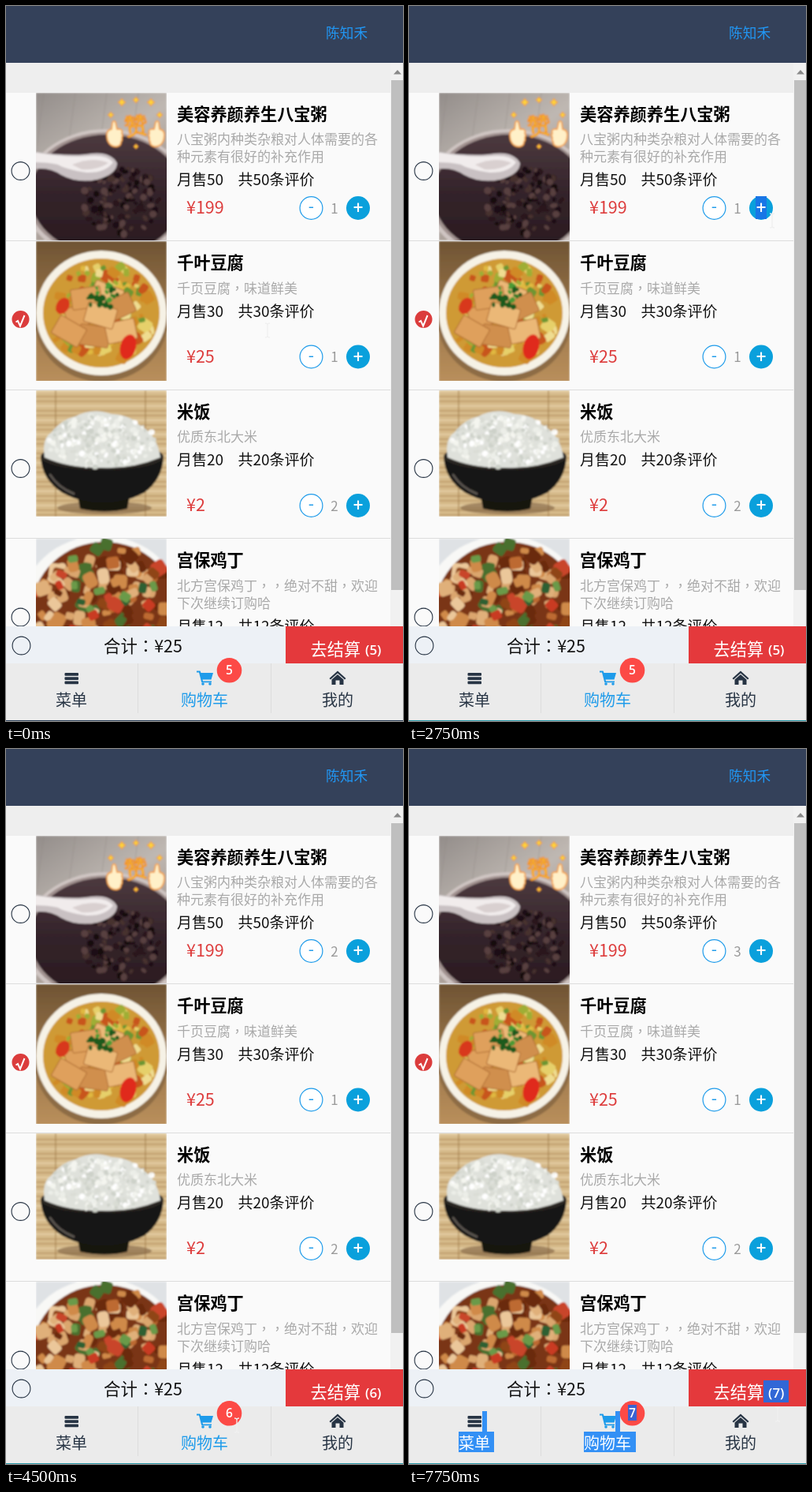
Animation of 504 by 906 pixels, one loop 8 s. Source, as an HTML page:

```html
<!DOCTYPE html>
<html lang="zh-CN">
<head>
<meta charset="utf-8">
<style>
html, body { margin: 0; width: 100%; height: 100%; overflow: hidden; background: #eee; }
svg { display: block; width: 100%; height: 100%; font-family: "Noto Sans CJK SC", "Noto Sans CJK", sans-serif; }
.stop { font-family: "Noto Sans CJK TC", "Noto Sans CJK", sans-serif; } /* centred punctuation */
.latin { font-family: "Open Sans", "Noto Sans", sans-serif; font-weight: 600; }
</style>
</head>
<body>
<svg id="stage" viewBox="0 0 504 906"></svg>
<script>
const MID = 0.375; // distance from baseline to glyph middle, in em
const BLUE = '#1e9bea', RED = '#e4393c', DARK = '#273444';

let seed = 7;
const rnd = (a = 0, b = 1) => (seed = seed * 16807 % 2147483647, a + seed / 2147483647 * (b - a));
const pick = list => list[Math.floor(rnd(0, list.length))];
const times = (n, f) => Array.from({ length: n }, (_, i) => f(i)).join('');

const rect = (x, y, w, h, fill, more = '') =>
  `<rect x="${x}" y="${y}" width="${w}" height="${h}" fill="${fill}" ${more}/>`;
const oval = (x, y, rx, ry, fill, more = '') =>
  `<ellipse cx="${x}" cy="${y}" rx="${rx}" ry="${ry}" fill="${fill}" ${more}/>`;
const path = (d, fill, more = '') => `<path d="${d}" fill="${fill}" ${more}/>`;
// y is the vertical middle of the line
const text = (s, x, y, size, fill, more = '') =>
  `<text x="${x}" y="${y + size * MID}" font-size="${size}" fill="${fill}" ${more}>` +
  String(s).replace(/[，：]/g, '<tspan class="stop" lang="zh-TW">$&</tspan>') + '</text>';
const turn = (a, x, y) => `transform="rotate(${a} ${x} ${y})"`;
const mid = 'text-anchor="middle"';

// a point spread evenly inside an ellipse
function inside(cx, cy, rx, ry) {
  const a = rnd(0, 6.283), r = Math.sqrt(rnd());
  return [cx + rx * r * Math.cos(a), cy + ry * r * Math.sin(a)];
}
const scatter = (n, area, colors, lo, hi, shape) => times(n, () => {
  const [x, y] = inside(...area), w = rnd(lo, hi), h = w * rnd(.6, 1), a = turn(rnd(0, 180), x, y);
  return shape === 'oval' ? oval(x, y, w, h, pick(colors), a)
    : rect(x - w, y - h, 2 * w, 2 * h, pick(colors), `rx="${w * .5}" ${a}`);
});

function photo(id, y, h, art) {
  return `<clipPath id="${id}"><rect x="38" y="${y}" width="166" height="${h}"/></clipPath>
    <g clip-path="url(#${id})"><g filter="url(#soft)">${art}</g></g>`;
}

function sticker() {
  const hand = path('M128 163q0-6 6-7l1-8q1-4 4-1l2 9h4q4 2 2 5q2 3 0 6q1 3-1 5q0 5-5 6q-6 1-10-4q-3-4-3-11z',
    '#fff0c8', 'stroke="#f3a04a" stroke-width="1.8"');
  const spark = (x, y, r) => path(`M${x} ${y - r}l${r * .4} ${r * .6}l${r * .6} ${r * .4}l${-r * .6} ${r * .4}l${-r * .4} ${r * .6}l${-r * .4} ${-r * .6}l${-r * .6} ${-r * .4}l${r * .6} ${-r * .4}z`, '#ffd23e', 'stroke="#f0902a"');
  return hand + `<g transform="matrix(-1 0 0 1 329 0)">${hand}</g>` +
    spark(147, 122, 5) + spark(165, 119, 4) + spark(184, 122, 5) + spark(195, 138, 4) + spark(133, 138, 4) + spark(165, 178, 3) +
    text('赞', 165, 152, 30, '#ffd42a', `${mid} stroke="#f0902a" stroke-width="1.3" ${turn(-6, 165, 152)}`);
}

const porridge = () =>
  rect(38, 110, 166, 187, 'url(#wood)') +
  times(4, i => path(`M${48 + i * 40} 110l-12 90`, 'none', 'stroke="#8d8580" stroke-opacity=".4"')) +
  oval(127, 240, 105, 84, '#cfc5c2') + oval(127, 239, 101, 79, '#a0918f') + oval(128, 239, 97, 76, 'url(#soup)') +
  scatter(130, [146, 246, 52, 44], ['#1d1013', '#2a181b', '#46302f', '#59413f', '#180c0f'], 2.5, 5, 'oval') +
  path('M34 184Q72 190 100 188Q132 182 141 199Q141 213 116 220Q90 225 70 214Q54 203 34 207z', '#c9c1c3') +
  path('M34 185Q80 193 106 190Q128 188 136 198Q126 212 102 211Q76 207 66 201Q54 198 34 198z', '#f1ecec') +
  path('M84 201Q110 190 130 199Q114 209 96 207z', '#d9d0d0') + sticker();

const tofu = () =>
  rect(38, 298, 166, 178, 'url(#cloth)') +
  oval(121, 393, 86, 83, '#8d6c44') + oval(121, 389, 83, 79, '#f6f2e6') + oval(121, 389, 74, 69, '#cf9a34') +
  scatter(110, [121, 389, 68, 63], ['#e0b83f', '#9fae34', '#d08a26', '#e6d06a', '#6d9630', '#c8541f', '#efdc90'], 3, 8) +
  [[95, 392, -15], [128, 366, 22], [112, 418, 8], [80, 412, 30], [146, 412, -12], [143, 382, -25], [102, 370, -8], [120, 392, 16]]
    .map(([x, y, a], i) => rect(x - 19, y - 13, 38, 26, ['#dfa05c', '#ebb877', '#d08f4e'][i % 3], `rx="2" stroke="#b06e34" ${turn(a, x, y)}`)).join('') +
  oval(155, 432, 10, 16, '#e02c1a', turn(15, 155, 432)) + oval(72, 380, 8, 11, '#d8371c', turn(30, 72, 380)) +
  scatter(26, [123, 368, 20, 18], ['#2f7a26', '#4b9a34', '#1f5a1c'], 2, 5, 'oval');

const rice = () =>
  rect(38, 487, 166, 160, '#d6ba8a') +
  times(27, i => rect(38, 488 + i * 6, 166, 1.6, i % 3 ? '#bd9b69' : '#e6d1a8')) +
  [62, 176].map(x => rect(x, 487, 2, 160, '#a27c4a', 'opacity=".5"')).join('') +
  oval(125, 636, 60, 8, '#7d6040', 'opacity=".6"') +
  path('M90 616h68l-4 21q-28 7-60 0z', '#15120f') +
  path('M44 570Q45 600 72 617Q96 630 123 630Q150 630 175 617Q199 600 200 570z', '#161412') +
  oval(122, 571, 78, 17, '#2c2724') +
  path('M49 572Q45 548 58 540Q70 524 88 520Q110 508 134 517Q156 518 168 530Q192 542 196 572Q160 587 122 585Q80 586 49 572z', '#dfe1db') +
  scatter(260, [122, 552, 69, 33], ['#fff', '#f4f5ef', '#d9dcd4', '#eceee8', '#cdd1c9'], 1.5, 4, 'oval') +
  path('M56 594Q66 610 86 618', 'none', 'stroke="#5a5450" stroke-width="3" stroke-linecap="round"');

const chicken = () =>
  rect(38, 675, 166, 111, '#dfe2e5') + oval(121, 768, 104, 97, '#f8f8f6') + oval(125, 766, 92, 87, '#7a3413') +
  scatter(150, [125, 762, 89, 80], ['#d08a48', '#bd6a30', '#e0b07a', '#ebc79a', '#8f4519', '#c9452a', '#4a6f2e', '#cf8a4a', '#dba66e', '#6b2a10'], 5, 10) +
  scatter(12, [121, 735, 72, 48], ['#2e6030', '#6b9a48', '#c93a20'], 5, 8);

const shade = (id, x2, ...colors) => `<linearGradient id="${id}" x2="${x2}" y2="1">` +
  colors.map((c, i) => `<stop offset="${i / (colors.length - 1)}" stop-color="${c}"/>`).join('') + '</linearGradient>';
const defs = `<defs><filter id="soft"><feGaussianBlur stdDeviation=".8"/></filter>` +
  shade('wood', .6, '#938d8a', '#bfb8b2', '#96877f') + shade('cloth', 0, '#6f5434', '#9a7548', '#b98f5c') +
  shade('soup', 0, '#4d3a3f', '#33232a', '#2a1b1f') + '</defs>';

const check = (x, y) => oval(x, y, 11.4, 11.4, 'none', `stroke="${DARK}" stroke-width="1.1"`);

function dish(y, name, lines, sold, price, count, id) {
  const soldY = y + 39 + lines.length * 22;
  let s = text(name, 217, y, 21.2, '#000', 'font-weight="bold"') +
    lines.map((l, i) => text(l, 217, y + 32 + i * 22, 17, '#a9a9a9')).join('') +
    text('月售' + sold, 217, soldY, 19, '#111') + text(`共${sold}条评价`, 294.5, soldY, 19, '#111');
  if (price) {
    const by = y + 119;
    s += text('¥' + price, 229, by - 1, 21.5, '#dd3b3b') +
      oval(387.5, by, 14.4, 14.4, '#fff', `stroke="${BLUE}" stroke-width="1.2"`) +
      text('-', 387.5, by - 2.5, 21, BLUE, mid) +
      text(count, 417, by + .5, 17, '#999', `${mid} id="${id}"`) +
      oval(447, by, 15, 15, '#0aa0dc') +
      (id === 'qty' ? rect(440, 241, 14, 29, '#1976e6', 'id="selPlus"') : '') +
      text('+', 447, by - .5, 23, '#fff', `${mid} class="latin"`);
  }
  return s;
}

const list =
  rect(0, 72, 488, 38, '#eee') + rect(0, 110, 488, 676, '#fafafa') +
  photo('p1', 110, 187, porridge()) + photo('p2', 298, 177, tofu()) +
  photo('p3', 487, 160, rice()) + photo('p4', 675, 111, chicken()) +
  [297, 486, 674].map(y => rect(0, y, 488, 1, '#dcdcdc')).join('') +
  check(18.5, 209) + check(18.5, 586) + check(18.5, 774.5) +
  oval(18.5, 397, 11, 11, '#db3c3c') +
  path('M12.5 400.5L15 399L18 405.5L23.500 392', 'none', 'stroke="#fff" stroke-width="2"') +
  dish(137, '美容养颜养生八宝粥', ['八宝粥内种类杂粮对人体需要的各', '种元素有很好的补充作用'], 50, 199, 1, 'qty') +
  dish(325.5, '千叶豆腐', ['千页豆腐，味道鲜美'], 30, 25, 1, 'q2') +
  dish(514, '米饭', ['优质东北大米'], 20, 2, 2, 'q3') +
  dish(702.5, '宫保鸡丁', ['北方宫保鸡丁，，绝对不甜，欢迎', '下次继续订购哈'], 12);

const scrollbar = rect(488, 72, 16, 714, '#f1f1f1') + path('M492 86.5l5-5.5l5 5.5z', '#8a8a8a') + rect(489, 94, 15, 646, '#bfbfbf');

const cart = path('M242 842.5h4.5l1 2.5H263l-2.5 8.5H249.5l.5 2H261v1.8H248.3L245 844.5h-3z', BLUE) +
  oval(250, 859, 1.8, 1.8, BLUE) + oval(259, 859, 1.8, 1.8, BLUE);
const house = path('M410.5 852L421 842.5L431.5 852L430 853.5L421 845.5L412 853.5z', DARK) +
  path('M413.5 853.5L421 847L428.5 853.5V860H423.5V854.5H418.5V860H413.5z', DARK);

const footer =
  rect(0, 786, 355, 47, '#edf1f6') + check(19.5, 810.5) + text('合计：¥25', 124, 811, 21.4, '#111') +
  rect(355, 786, 149, 47, RED) + rect(450, 800, 32, 28, '#3267d6', 'class="selAll"') +
  text('去结算', 386.5, 815, 21.2, '#fff') + text('(5)', 456, 815.5, 17, '#fff', 'id="total" class="latin"') +
  rect(0, 833, 504, 73, '#ebebeb') + rect(167, 833, 1, 63, '#dcdcdc') + rect(336, 833, 1, 63, '#dcdcdc') +
  times(3, i => rect(74.5, 845 + i * 5.2, 17.5, 3.8, DARK, 'rx="1"')) + cart + house +
  text('菜单', 63, 879.5, 20, DARK) + text('购物车', 222, 879.5, 20, BLUE) + text('我的', 401, 879.5, 20, DARK) +
  `<g class="selAll">${[[93, 839, 6], [63, 865, 45], [262, 839, 6], [222, 865, 66]].map(([x, y, w]) => rect(x, y, w, 26, '#3390f5')).join('')}
    ${text('菜单', 63, 879.5, 20, '#fff')}${text('购物车', 222, 879.5, 20, '#fff')}</g>` +
  oval(283.5, 841.8, 15.8, 15.8, '#fc4a46') + rect(278, 831, 11, 20, '#3b62d2', 'id="selBadge"') +
  text('5', 283.5, 841.3, 15.5, '#fff', `id="badge" ${mid} class="latin"`) +
  rect(0, 905, 504, 1, '#2c4058', 'id="edge"');

const ink = 'stroke="#000" stroke-width="1.3" stroke-linejoin="round"';
const pointers = {
  arrow: path('M0 0V20.5L4.5 16.5L8 24.5L11.5 23L8.3 15H14z', '#fff', ink),
  beam: path('M-3 -9Q0 -9 0 -7Q0 -9 3 -9M0 -7V7M-3 9Q0 9 0 7Q0 9 3 9', 'none', 'stroke="#f0f0f0" stroke-width="1.3"'),
  hand: path('M-2 2Q-2 0 0 0Q2 0 2 2V10Q6 8 6 11Q10 9 10 12Q14 10.5 14 14V20Q14 24 11 26V30H-1V26L-7 18Q-9 14 -6 14L-2 17z', '#fff', ink) +
    path('M2 10V15M6 11V15.5M10 12V16', 'none', ink)
};

document.getElementById('stage').innerHTML = defs + list + scrollbar +
  rect(0, 0, 504, 72, '#34415a') + text('陈知禾', 406, 34, 17.7, '#2196f3') + footer +
  `<g id="cursor">${Object.keys(pointers).map(k => `<g id="${k}">${pointers[k]}</g>`).join('')}</g>`;

// time, x, y, pointer while resting there
const track = [
  [0, 332, 411, 'beam'], [1250, 235, 660, 'arrow'], [2000, 447, 258, 'arrow'], [2500, 447, 258, 'arrow'],
  [2750, 461, 272, 'beam'], [3750, 461, 272, 'beam'], [4500, 293, 857, 'beam'], [5000, 293, 857, 'beam'],
  [5750, 460, 263, 'arrow'], [6500, 460, 263, 'arrow'], [7250, 361, 849, 'hand'], [7750, 468, 843, 'beam'], [8000, 468, 843, 'beam']
];
const $ = id => document.getElementById(id);
const show = (el, on) => el.setAttribute('visibility', on ? 'visible' : 'hidden');

function frame(now) {
  const t = Math.floor(now % 8000 / 250) * 250; // the picture ticks four times a second
  const i = track.findIndex((k, n) => t >= k[0] && t < track[n + 1][0]);
  const [t0, x0, y0, kind] = track[i], [t1, x1, y1] = track[i + 1];
  const p = (t - t0) / (t1 - t0), moving = p > 0 && (x0 !== x1 || y0 !== y1);
  $('cursor').setAttribute('transform', `translate(${x0 + (x1 - x0) * p} ${y0 + (y1 - y0) * p})`);
  for (const k in pointers) show($(k), k === (moving ? 'arrow' : kind));

  const added = (t >= 3250) + (t >= 6250);
  $('qty').textContent = 1 + added;
  $('badge').textContent = 5 + added;
  $('total').textContent = `(${5 + added})`;

  const all = t >= 7750;
  show($('selPlus'), t >= 2750 && t < 4250);
  show($('selBadge'), t >= 5000 && t < 6000 || all);
  document.querySelectorAll('.selAll').forEach(el => show(el, all));
  $('edge').setAttribute('fill', t < 2750 ? '#2c4058' : '#2a9aa8');
  requestAnimationFrame(frame);
}
requestAnimationFrame(frame);
</script>
</body>
</html>
```
